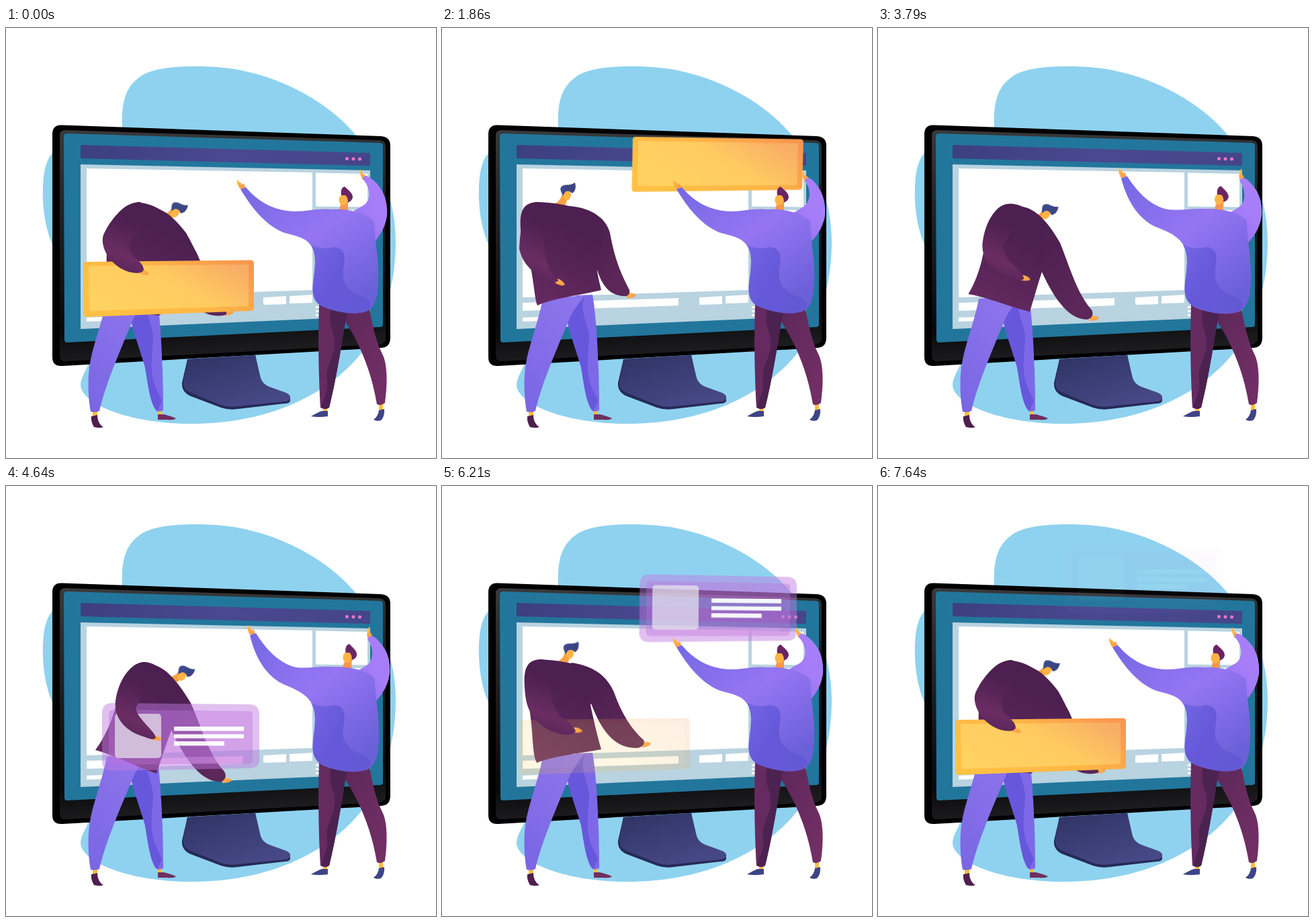
An HTML page without scripts that plays this animation: 640x640 px, repeating every 7.71 s.

```html
<!DOCTYPE html>
<html lang="en">
<head>
<meta charset="utf-8">
<title>Building a web page</title>
<style>
html, body { margin: 0; width: 100%; height: 100%; overflow: hidden; background: #fff; }
svg { display: block; width: 100%; height: 100%; }
.move { animation: 7.71s ease-in-out infinite; }

/* banner and card */
#banner { transform-origin: 242px 387px; animation-name: banner; }
#card { transform-origin: 260px 374px; animation-name: card; }
@keyframes banner {
  0%, 3% { transform: none; opacity: 1; }
  14.8% { transform: translate(48px, -73px) rotate(-28deg); animation-timing-function: ease-out; }
  20.8%, 24.1% { transform: translate(168px, -183px) rotate(1.4deg); opacity: 1; animation-timing-function: linear; }
  30.6% { transform: translate(164px, -201px) rotate(1.4deg); opacity: .7; animation-timing-function: linear; }
  39.8% { transform: translate(154px, -250px) rotate(1.4deg); opacity: .12; animation-timing-function: ease-out; }
  51% { transform: translate(146px, -288px) rotate(1.4deg); opacity: 0; }
  51.1%, 72.2% { transform: none; opacity: 0; }
  80.5% { opacity: .17; animation-timing-function: linear; }
  91.7%, 100% { transform: none; opacity: 1; }
}
@keyframes card {
  0%, 51.9% { transform: none; opacity: 0; }
  60.2% { opacity: .95; }
  62.1% { transform: none; opacity: 1; }
  68.2% { transform: translate(46px, -66px) rotate(-28deg); animation-timing-function: ease-out; }
  73.9% { transform: translate(155px, -172px) rotate(.5deg); opacity: 1; animation-timing-function: linear; }
  80.5% { transform: translate(151px, -190.5px) rotate(.5deg); opacity: .95; animation-timing-function: linear; }
  91.7% { transform: translate(141px, -220px) rotate(.5deg); opacity: .4; animation-timing-function: linear; }
  99.1% { transform: translate(136px, -234px) rotate(.5deg); opacity: .05; }
  100% { transform: translate(136px, -235px) rotate(.5deg); opacity: 0; }
}

/* carrier, on the left */
#lBody { animation-name: lBody; }
#lBack { animation-name: lBack; }
#lFront { animation-name: lFront; }
#lHead { transform-origin: 186px 248px; animation-name: lHead; }
#lHandB { animation-name: lHandB; }
#lHandF { animation-name: lHandF; }
@keyframes lBody {
  0%, 2%, 91.7%, 100% { d: path("M150 300C170 265 185 259 200 260C222 262 250 280 268 305C285 335 290 350 285 370C270 390 250 410 228 428C200 425 170 420 146 405C150 380 150 330 150 300Z"); }
  13.5%, 14.8%, 67%, 68.5% { d: path("M132 290C129 265 142 256 158 257C190 259 220 266 246 288C240 320 234 350 232 370C234 385 236 395 236 402C205 400 165 402 140 411C136 400 140 330 132 290Z"); }
  22.5%, 25%, 38%, 41.6% { d: path("M117 300C115 270 122 260 142 259C175 260 215 268 238 285C240 320 234 350 231 362C233 375 236 385 237 390C205 398 165 402 142 413C136 400 138 360 117 300Z"); }
  52%, 62% { d: path("M170 300C180 270 195 262 207 262C223 263 235 275 243 290C254 318 252 350 246 364C238 385 230 410 224 428C200 420 160 400 133 393C147 374 161 347 170 300Z"); }
  76%, 80.5% { d: path("M123 300C121 270 127 259 147 258C180 260 212 266 234 281C230 310 224 318 221 326C226 350 232 375 237 392C205 398 165 402 141 412C132 395 138 350 123 300Z"); }
}
@keyframes lBack {
  0%, 2%, 91.7%, 100% { d: path("M215 268C245 268 265 300 284 335C300 370 305 400 325 420C330 424 330 427 322 428C305 430 290 424 280 410C260 380 215 300 215 268Z"); }
  13.5%, 14.8%, 67%, 68.5% { d: path("M190 262C220 268 245 282 262 300C290 320 310 330 328 338C330 345 320 352 305 353C285 352 250 335 225 320C205 300 190 280 190 262Z"); }
  22.5%, 25%, 38%, 41.6% { d: path("M190 265C225 268 245 285 250 305C258 350 270 372 279 390C280 396 277 400 270 399C255 398 240 390 231 360C215 340 190 300 190 265Z"); }
  52%, 62% { d: path("M215 266C235 266 256 291 275 323C291 358 300 397 325 425C329 432 326 438 320 440C295 442 270 415 246 363C235 340 215 300 215 266Z"); }
  76%, 80.5% { d: path("M192 263C223 267 245 281 256 307C267 339 283 363 300 378C303 384 298 389 290 390C262 390 241 374 222 324C205 305 192 290 192 263Z"); }
}
@keyframes lFront {
  0%, 2%, 91.7%, 100% { d: path("M200 259C178 258 155 285 145 308C139 325 155 355 183 363C195 366 203 365 205 360C205 352 196 345 190 340C184 332 184 328 182 318C205 300 215 275 200 259Z"); }
  13.5%, 14.8%, 67%, 68.5% { d: path("M155 257C136 257 129 270 131 290C140 325 165 352 195 355C215 357 230 352 235 343C230 333 215 328 200 322C190 312 182 300 180 290C178 270 170 259 155 257Z"); }
  22.5%, 25% { d: path("M142 259C122 260 118 285 115 328C118 345 130 362 150 371C160 376 168 379 173 377C173 373 168 370 163 364C155 350 150 330 152 305C155 290 160 262 142 259Z"); }
  38%, 41.6% { d: path("M142 260C118 262 113 290 114 328C120 345 135 355 150 360C165 366 180 370 186 364C186 358 180 350 168 347C155 338 150 325 150 305C155 290 160 262 142 260Z"); }
  52%, 62% { d: path("M207 262C185 262 167 290 163 320C160 345 178 365 205 373C214 377 220 378 223 375C222 368 214 362 206 352C200 345 195 340 193 330C205 310 215 280 207 262Z"); }
  76%, 80.5% { d: path("M147 258C126 260 119 280 125 318C130 345 150 362 175 369C188 372 196 370 199 365C196 357 188 350 178 344C168 335 162 318 161 300C163 285 165 261 147 258Z"); }
}
@keyframes lHead {
  0%, 2%, 91.7%, 100% { transform: translate(66px, 26px) rotate(28deg); }
  13.5%, 14.8%, 67%, 68.5% { transform: translate(14px, 3px) rotate(0deg); }
  22.5%, 25% { transform: translate(0px, 0px) rotate(0deg); }
  38%, 41.6% { transform: translate(-2px, 0px) rotate(0deg); }
  52%, 62% { transform: translate(76px, 34px) rotate(31deg); }
  76%, 80.5% { transform: translate(4px, 1px) rotate(3deg); }
}
@keyframes lHandB {
  0%, 2%, 91.7%, 100% { transform: translate(327px, 424px) rotate(-6deg); }
  13.5%, 14.8%, 67%, 68.5% { transform: translate(335px, 331px) rotate(-28deg); }
  22.5%, 25%, 38%, 41.6% { transform: translate(277px, 398px) rotate(-3deg); }
  52%, 62% { transform: translate(324px, 438px) rotate(-3deg); }
  76%, 80.5% { transform: translate(299px, 385px) rotate(-10deg); }
}
@keyframes lHandF {
  0%, 2%, 91.7%, 100% { transform: translate(202px, 362px) rotate(20deg); }
  13.5%, 14.8%, 67%, 68.5% { transform: translate(234px, 344px) rotate(-6deg); }
  22.5%, 25% { transform: translate(172px, 377px) rotate(25deg); }
  38%, 41.6% { transform: translate(187px, 358px) rotate(-5deg); }
  52%, 62% { transform: translate(220px, 374px) rotate(14deg); }
  76%, 80.5% { transform: translate(197px, 363px) rotate(6deg); }
}

/* helper, on the right */
#rBody { animation-name: rBody; }
#rShade { animation-name: rShade; }
#rBack { animation-name: rBack; }
#rHead { transform-origin: 502px 256px; animation-name: rHead; }
#rHandF { animation-name: rHandF; }
#rHandB { animation-name: rHandB; }
@keyframes rBody {
  0%, 1%, 20.4%, 41.6%, 75%, 100% { d: path("M349 240L357 237C378 262 402 272 430 273C450 273 462 268 484 270C508 268 535 275 548 288C548 315 556 345 554 380C553 405 548 416 538 421C515 430 485 420 470 414C459 408 455 398 457 380C460 355 463 338 454 324C446 311 428 309 412 304C385 292 366 268 349 240Z"); }
  13%, 14.8%, 67%, 68.5% { d: path("M316 335L319 328C340 338 358 341 372 337C390 325 400 295 425 294C450 284 500 280 516 302C522 325 548 345 548 384C546 405 540 416 530 420C510 432 485 430 468 425C457 418 454 408 455 398C454 375 442 362 429 346C420 350 405 360 392 364C370 372 336 350 316 335Z"); }
  51%, 61.5% { d: path("M363 222L372 219C390 248 410 265 432 270C452 272 466 268 486 269C510 268 538 274 549 287C549 315 557 345 555 380C554 405 548 416 538 422C515 430 485 422 470 415C459 408 455 398 457 380C460 355 463 338 454 322C446 309 430 302 415 296C390 285 372 260 363 222Z"); }
}
@keyframes rShade {
  0%, 1%, 20.4%, 61.5%, 75%, 100% { d: path("M454 323C470 330 480 328 488 326C508 328 504 345 502 360C499 383 512 392 528 399C544 404 547 414 538 421C515 430 485 420 470 414C459 408 455 398 457 380C460 355 463 338 454 323Z"); }
  13%, 14.8%, 67%, 68.5% { d: path("M430 347C445 350 455 345 468 342C490 345 494 360 495 372C496 388 508 395 522 400C538 404 539 414 530 420C510 432 485 430 468 425C457 418 454 408 455 398C454 375 442 362 430 347Z"); }
}
@keyframes rBack {
  0%, 1%, 75%, 100% { d: path("M531 225C531 219 537 219 541 222C560 235 569 255 567 280C564 298 556 310 547 320C535 315 515 300 505 285C515 272 522 270 532 264C544 256 543 238 531 225Z"); }
  13%, 14.8%, 67%, 68.5% { d: path("M418 268C416 262 420 258 425 256C450 246 485 247 500 262C514 275 520 290 516 306C505 310 480 300 470 290C480 285 475 277 465 274C450 268 432 270 418 268Z"); }
  20.4%, 41.6% { d: path("M540 228C541 222 546 222 550 225C564 238 572 255 570 280C566 300 556 312 547 320C535 315 515 300 510 288C520 274 530 272 538 266C549 258 550 240 540 228Z"); }
  51%, 61.5% { d: path("M538 228C540 222 545 222 550 226C565 240 573 255 571 280C568 300 558 312 549 322C535 315 515 300 510 288C520 274 530 272 538 266C548 258 547 240 538 228Z"); }
}
@keyframes rHead {
  0%, 1%, 20.4%, 41.6%, 75%, 100% { transform: translate(0px, 0px) rotate(0deg); }
  13%, 14.8%, 67%, 68.5% { transform: translate(-50px, 13px) rotate(-35deg); }
  51%, 61.5% { transform: translate(6px, -1px) rotate(3deg); }
}
@keyframes rHandF {
  0%, 1%, 20.4%, 41.6%, 75%, 100% { transform: translate(353px, 239px) rotate(0deg); }
  13%, 14.8%, 67%, 68.5% { transform: translate(317px, 332px) rotate(-22deg); }
  51%, 61.5% { transform: translate(367px, 221px) rotate(8deg); }
}
@keyframes rHandB {
  0%, 1%, 75%, 100% { transform: translate(535px, 224px) rotate(0deg); }
  13%, 14.8%, 67%, 68.5% { transform: translate(419px, 264px) rotate(-58deg); }
  20.4%, 41.6% { transform: translate(544px, 226px) rotate(0deg); }
  51%, 61.5% { transform: translate(542px, 225px) rotate(27deg); }
}
</style>
</head>
<body>
<svg viewBox="0 0 640 640">
  <defs>
    <linearGradient id="bezel" x2=".1" y2="1"><stop stop-color="#3a3a3c"/><stop offset=".3" stop-color="#262628"/><stop offset=".85" stop-color="#08080a"/><stop offset="1" stop-color="#1c1c1e"/></linearGradient>
    <linearGradient id="bar"><stop stop-color="#3c3f80"/><stop offset=".5" stop-color="#4a4890"/><stop offset="1" stop-color="#454589"/></linearGradient>
    <linearGradient id="stand" x2=".6" y2="1"><stop stop-color="#2f3363"/><stop offset="1" stop-color="#474886"/></linearGradient>
    <linearGradient id="gold" y1=".7" x2="1" y2=".2"><stop stop-color="#ffc143"/><stop offset=".55" stop-color="#ffb545"/><stop offset="1" stop-color="#f9974f"/></linearGradient>
    <linearGradient id="goldIn" y1=".7" x2="1" y2=".2"><stop stop-color="#ffd261"/><stop offset=".55" stop-color="#ffcb60"/><stop offset="1" stop-color="#f8ad66"/></linearGradient>
    <linearGradient id="plum" x1=".7" x2=".3" y2="1"><stop offset=".25" stop-color="#4c2050"/><stop offset="1" stop-color="#652a60"/></linearGradient>
    <linearGradient id="sleeve" x1=".6" x2=".4" y2="1"><stop offset=".25" stop-color="#4c2050"/><stop offset=".75" stop-color="#6a2d63"/><stop offset="1" stop-color="#582558"/></linearGradient>
    <linearGradient id="backSleeve" x2=".6" y2="1"><stop offset=".3" stop-color="#4c2050"/><stop offset="1" stop-color="#5c2759"/></linearGradient>
    <linearGradient id="jean" x1=".8" x2=".2" y2="1"><stop stop-color="#8e75ec"/><stop offset="1" stop-color="#7b67e4"/></linearGradient>
    <linearGradient id="shirt" x2=".7" y2="1"><stop stop-color="#7468e2"/><stop offset=".5" stop-color="#9575f2"/><stop offset="1" stop-color="#6a60d8"/></linearGradient>
    <linearGradient id="shade" x2="1" y2=".6"><stop stop-color="#7466e3"/><stop offset=".5" stop-color="#6559da"/><stop offset="1" stop-color="#6459d4"/></linearGradient>
    <linearGradient id="raised" x1="1" x2=".2" y2="1"><stop stop-color="#a880fa"/><stop offset=".5" stop-color="#a57df8"/><stop offset="1" stop-color="#8b6eee"/></linearGradient>
    <linearGradient id="skin" x2="1" y2="1"><stop stop-color="#ffc23f"/><stop offset="1" stop-color="#f8924f"/></linearGradient>
    <linearGradient id="hair" x2="1"><stop stop-color="#3e4a8c"/><stop offset="1" stop-color="#39437f"/></linearGradient>
    <linearGradient id="trouser" y2="1"><stop stop-color="#5c2759"/><stop offset="1" stop-color="#743067"/></linearGradient>
    <path id="palm" d="M-3-3C2-5 9-3 12 0C11 4 3 4-2 4Z" fill="url(#skin)"/>
  </defs>

  <path fill="#8fd2ef" d="M173 150C171 105 180 84 205 69C235 54 300 55 340 61C415 74 483 113 522 161C560 205 580 260 580 320C580 375 565 440 528 485C490 532 410 589 275 589C200 589 125 568 112 537C108 525 118 512 124 498C110 440 78 360 69 322C55 290 53 250 56 222C58 205 62 195 69 186C100 170 150 160 173 150Z"/>

  <g id="monitor">
    <path fill="#262a57" d="M270 493L371 487L379 525Q382 534 392 538L417 546Q424 549 423 555Q422 559 414 559L345 567Q332 569 320 565L275 548Q261 542 262 528Z"/>
    <path fill="url(#stand)" d="M270 493L371 487L379 521Q382 530 392 534L417 543Q424 546 423 551Q422 556 414 556L345 563Q332 565 320 561L275 543Q263 538 264 527Z"/>
    <path d="M69 158Q69 144 83 144.500L558 161Q572 162 572 175V461Q572 475 559 476L84 503Q69 504 69 490Z"/>
    <path fill="url(#bezel)" d="M80 160Q80 152 88 152L556 167Q565 168 565 176V462Q565 470 556 471L90 496Q80 497 80 487Z"/>
    <path fill="#22769c" d="M86 162Q86 157 91 157L556 171Q561 171 561 176V441Q561 445 557 445L91 468Q87 468 87 464Z"/>
    <path fill="url(#bar)" d="M111 174L542 186V205L111 194Z"/>
    <g fill="#e878c8"><circle cx="507.500" cy="194.500" r="2.500"/><circle cx="517" cy="194.800" r="2.500"/><circle cx="526.500" cy="195" r="2.500"/></g>
    <path fill="#b9d3e0" d="M111 203L542 212V429.500L111 448Z"/>
    <path fill="#fff" d="M120 209L456 215V390L120 401ZM461 215.500L538 217V266.500L461 265.500ZM461 271H538V338H461ZM461 343H538V387L461 390ZM120 409L352 402V413L120 421ZM383 401L417 399V411L383 412ZM422 399L456 397V409L422 410ZM120 431L200 428V434L120 437ZM461 414H538V417H461ZM461 420H538V423H461ZM461 426H538V429H461Z"/>
  </g>

  <g id="carrier">
    <path fill="#ffbc3f" d="M129 570H136V579H129ZM226 569H232V577H226Z"/>
    <path fill="#4e1f4f" d="M127 578L136 576C136 585 140 591 145 594Q140 596 131 594Q126 586 127 578Z"/>
    <path fill="#70305f" d="M226 575H235Q247 578 253 581Q250 584 240 583L226 583Z"/>
    <path fill="#7d69e8" d="M200 398L224 397C230 430 234 500 234 569Q228 572 224 570C215 560 212 535 207 505C200 480 192 460 186 435Z"/>
    <path fill="#6757dc" d="M213 398C202 425 221 442 219 465C217 490 214 510 221 530C226 545 231 550 232 556L225 570C215 560 212 535 207 505C200 480 192 460 186 435Z"/>
    <path fill="url(#jean)" d="M150 403C143 440 128 475 124 505C121 530 123 555 126 571Q133 573 139 570C148 530 170 480 190 432C198 415 208 400 213 398Z"/>
    <g id="lHead" class="move">
      <path fill="#f9a044" d="M162 264Q176 260 179 247L187 253L183 266Z"/>
      <ellipse cx="186" cy="248" rx="6" ry="8.500" fill="#ffb443"/>
      <path fill="url(#hair)" d="M177 243Q174 235 184 233.500Q192 234 198 230Q201 241 194 246Q189 241 184 243.500Q181 247 180 250Z"/>
    </g>
    <use id="lHandB" class="move" href="#palm"/>
    <path id="lBack" class="move" fill="url(#backSleeve)"/>
    <path id="lBody" class="move" fill="url(#plum)"/>
  </g>

  <g id="banner" class="move">
    <path fill="url(#gold)" d="M115 352Q115 348 120 348L364 345.500Q369 345.500 369 350V416Q369 421 364 421L120 430Q115 430 115.500 425Z"/>
    <path fill="url(#goldIn)" d="M123 357Q123 354 126 354L358 352Q361 352 361 355V411Q361 414 358 414L127 421Q124 421 124 418Z"/>
  </g>
  <g id="card" class="move">
    <path fill="#c07be2" fill-opacity=".5" d="M143 338Q143 323 158 323L362 325Q377 325 377 340V406Q377 420 363 420L158 424Q143 424 143 410Z"/>
    <path fill="#bd70dc" fill-opacity=".42" d="M153 340Q153 333 160 333L361 335Q367 335 367 341V407Q367 413 361 413L160 415Q153 415 153 408Z"/>
    <path fill="#d99ae6" fill-opacity=".45" d="M232 404L353 402V412L232 414Z"/>
    <rect x="162" y="339" width="69" height="66" rx="5" fill="#e6dcee" fill-opacity=".82"/>
    <path fill="#fff" d="M250 358H354V364.500H250ZM250 369.500H354V375.500H250ZM250 380H325V386.500H250Z"/>
  </g>

  <use id="lHandF" class="move" href="#palm"/>
  <path id="lFront" class="move" fill="url(#sleeve)"/>

  <g id="helper">
    <path fill="#ffbc3f" d="M472 564H478V572H472ZM555 560H561V569H555Z"/>
    <path fill="#3e4488" d="M454 578Q464 572 470 570H479V578Q465 580 454 578ZM555 569L563 567Q564 578 558 584Q552 586 547 583Q554 578 555 569Z"/>
    <path fill="url(#trouser)" d="M500 412L540 413C545 440 550 465 560 485C568 500 568 530 564 558Q558 563 552 560C543 505 523 465 505 437Z"/>
    <path fill="#652b60" d="M466 412C464 470 466 530 468 565Q475 569 481 565C490 530 500 470 505 437L515 412Z"/>
    <path fill="#4c2251" d="M487 412C474 438 492 452 489 475C486 495 475 505 478 525C480 545 470 552 470 565Q475 569 481 565C490 530 500 470 505 437L512 412Z"/>
    <path id="rHandB" class="move" fill="url(#skin)" d="M-4 2C-7-3-9-8-8-14L-4-7C0-5 3-3 4 1Z"/>
    <path id="rBack" class="move" fill="url(#raised)"/>
    <g id="rHead" class="move">
      <path fill="#f8964c" d="M499 260L509 256V276H494Z"/>
      <ellipse cx="502" cy="256" rx="6.500" ry="8" fill="#ffb343"/>
      <path fill="#6b2463" d="M499 249Q497 238 504 236C509 241 516 245 516 252C515 257 512 258 509 260Q509 252 505 249Z"/>
    </g>
    <path id="rHandF" class="move" fill="url(#skin)" d="M-4 1C-7-3-10-8-9-13C-5-9-2-8-1-6L1-8C2-5 3-1 4-1Z"/>
    <path id="rBody" class="move" fill="url(#shirt)"/>
    <path id="rShade" class="move" fill="url(#shade)"/>
  </g>
</svg>
</body>
</html>
```
